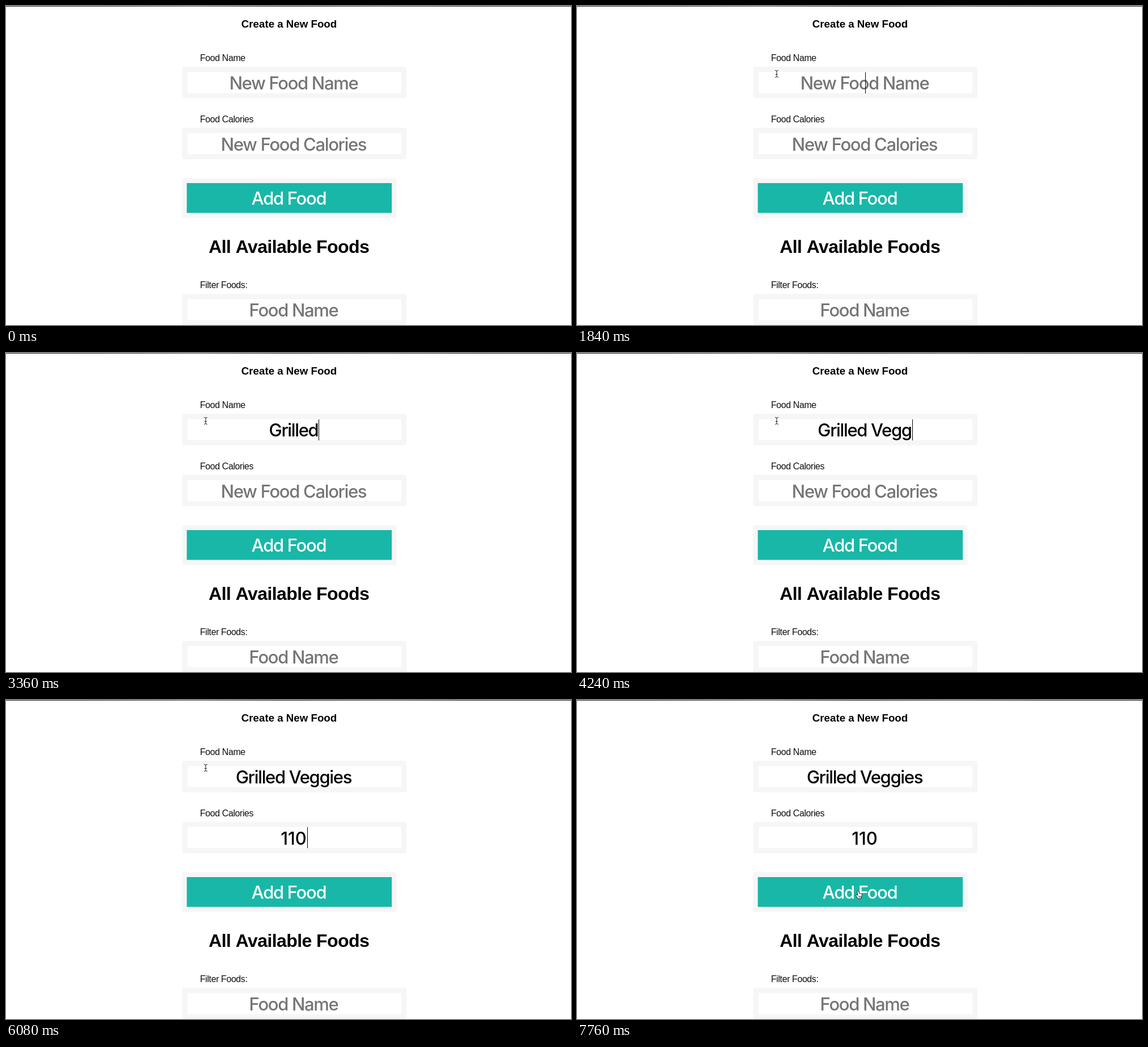
Write an HTML page with a canvas that moves like this. It is 996x562 px and loops after 8000 ms.

```html
<!DOCTYPE html>
<html lang="en">
<head>
<meta charset="utf-8">
<title>Create a New Food</title>
<style>
html, body { margin: 0; width: 100%; height: 100%; overflow: hidden; background: #fff; }
canvas { display: block; }
</style>
</head>
<body>
<canvas id="stage" width="996" height="562"></canvas>
<script>
const ctx = document.getElementById('stage').getContext('2d');
const LOOP = 8000, STEP = 80;
const SANS = '"Liberation Sans", Arial, sans-serif';
const INPUT = '450 31px Inter, Roboto, sans-serif';
const TIGHT = '-0.043em';
const MID = 508;

// Time of each keystroke
const nameKeys = [2400, 2640, 2800, 2880, 3040, 3120, 3360, 3440, 3600, 3840, 4000, 4240, 4320, 4400, 4560];
const calorieKeys = [5760, 6000, 6080];
// Spans in which the caret shows
const nameCaret = [[880, 1360], [1840, 2320], [2400, 4960]];
const calorieCaret = [[4960, 5440], [5760, 6560], [7040, 7520]];
// Pointer moves: start, end, from, to
const moves = [
  [240, 880, [585, 506], [358, 130]],
  [1200, 1440, [358, 130], [352, 119.5]],
  [6720, 7360, [352, 119.5], [489, 339]],
  [7520, 7760, [489, 339], [495.5, 337]]
];

const typed = (word, keys, t) => word.slice(0, keys.filter(k => k <= t).length);
const within = (spans, t) => spans.some(([a, b]) => t >= a && t < b);
const ease = p => p * p * (3 - 2 * p);

function text(s, x, y, font, color, spacing = '0px', align = 'center') {
  ctx.font = font;
  ctx.letterSpacing = spacing;
  ctx.textAlign = align;
  ctx.fillStyle = color;
  ctx.fillText(s, x, y);
  return ctx.measureText(s).width;
}

function box(x, y, w, h, color, radius = 0) {
  ctx.fillStyle = color;
  ctx.beginPath();
  ctx.roundRect(x, y, w, h, radius);
  ctx.fill();
}

function field(label, y, hint, value = '', caret = false) {
  text(label, 342, y - 10, '16px ' + SANS, '#111', '-0.42px', 'left');
  box(310.5, y, 395.5, 55.5, '#f6f6f6', 4);
  box(320, y + 9.5, 377, 37, '#fff');
  const spacing = /^\d/.test(value) ? '0px' : TIGHT;
  const width = text(value || hint, MID - 1, y + 40, INPUT, value ? '#000' : '#757575', spacing);
  if (caret) box(value ? Math.round(MID + width / 2) : MID, Math.round(y + 9.5), 1, 37, '#000');
}

function topEdge() {
  const g = ctx.createLinearGradient(0, 0, 996, 0);
  ['#222', '#2a2a2a', '#555', '#222', '#444', '#222', '#2a2a2a']
    .forEach((c, i, all) => g.addColorStop(i / (all.length - 1), c));
  box(0, 0, 996, 1, g);
}

function outline(d, fill, stroke) {
  const p = new Path2D(d);
  ctx.lineJoin = ctx.lineCap = 'round';
  ctx.lineWidth = 1;
  if (fill) { ctx.fillStyle = fill; ctx.fill(p); }
  ctx.strokeStyle = stroke;
  ctx.stroke(p);
}

function pointer(t) {
  if (t < moves[0][0]) return;
  const [start, end, from, to] = moves.filter(m => m[0] <= t).pop();
  // Every move but the first has already left its resting place at its start
  const lead = start === moves[0][0] ? 0 : STEP;
  const p = ease(Math.min(1, (t - start + lead) / (end - start + lead)));
  const [x, y] = from.map((v, i) => v + (to[i] - v) * p);
  const over = (x0, x1, y0, y1) => x > x0 && x < x1 && y > y0 && y < y1;
  ctx.save();
  ctx.translate(x, y);
  if (over(310, 706, 107, 163) || over(310, 706, 215, 270) || over(310, 706, 508, 562)) {
    outline('M-2.5 -6Q0 -6 0 -4.5Q0 -6 2.5 -6M0 -4.5V4.5M-2.5 6Q0 6 0 4.5Q0 6 2.5 6M-1.5 1H1.5', null, '#222');
  } else if (over(310, 689, 303, 373)) {
    outline('M-1.5 0Q0 -2 1.2 0L2 4Q3 3 4 4.2Q5 3.6 5.8 4.8Q7 4.6 7 6.2L6.3 10L5.5 13H-.5L-2.5 9.5L-4.2 7Q-3.8 5.4 -2 6.2L-.8 7.2Z',
      '#fff', '#222');
    outline('M1.5 8.5V11M3.2 8.5V11M4.8 8.5V11', null, '#555');
  } else {
    outline('M0 0V14L3.2 11L5.4 16L7.6 15L5.4 10.2H10Z', '#000', '#fff');
  }
  ctx.restore();
}

function draw(t) {
  box(0, 0, 996, 562, '#fff');
  topEdge();
  text('Create a New Food', 499, 37.5, 'bold 18.72px ' + SANS, '#000');
  field('Food Name', 107, 'New Food Name', typed('Grilled Veggies', nameKeys, t), within(nameCaret, t));
  field('Food Calories', 214.5, 'New Food Calories', typed('110', calorieKeys, t), within(calorieCaret, t));
  box(310.5, 303.5, 378, 70, '#f6f6f6', 4);
  box(318.7, 312, 361.3, 52.5, '#19b7a7');
  text('Add Food', 498.5, 350, INPUT, '#fff', TIGHT);
  text('All Available Foods', 498.7, 434.5, 'bold 32px ' + SANS, '#000', '-0.58px');
  field('Filter Foods:', 507, 'Food Name');
  pointer(t);
}

function tick() {
  const t = performance.now() % LOOP;
  draw(Math.floor(t / STEP) * STEP);
  requestAnimationFrame(tick);
}
tick();
</script>
</body>
</html>
```
